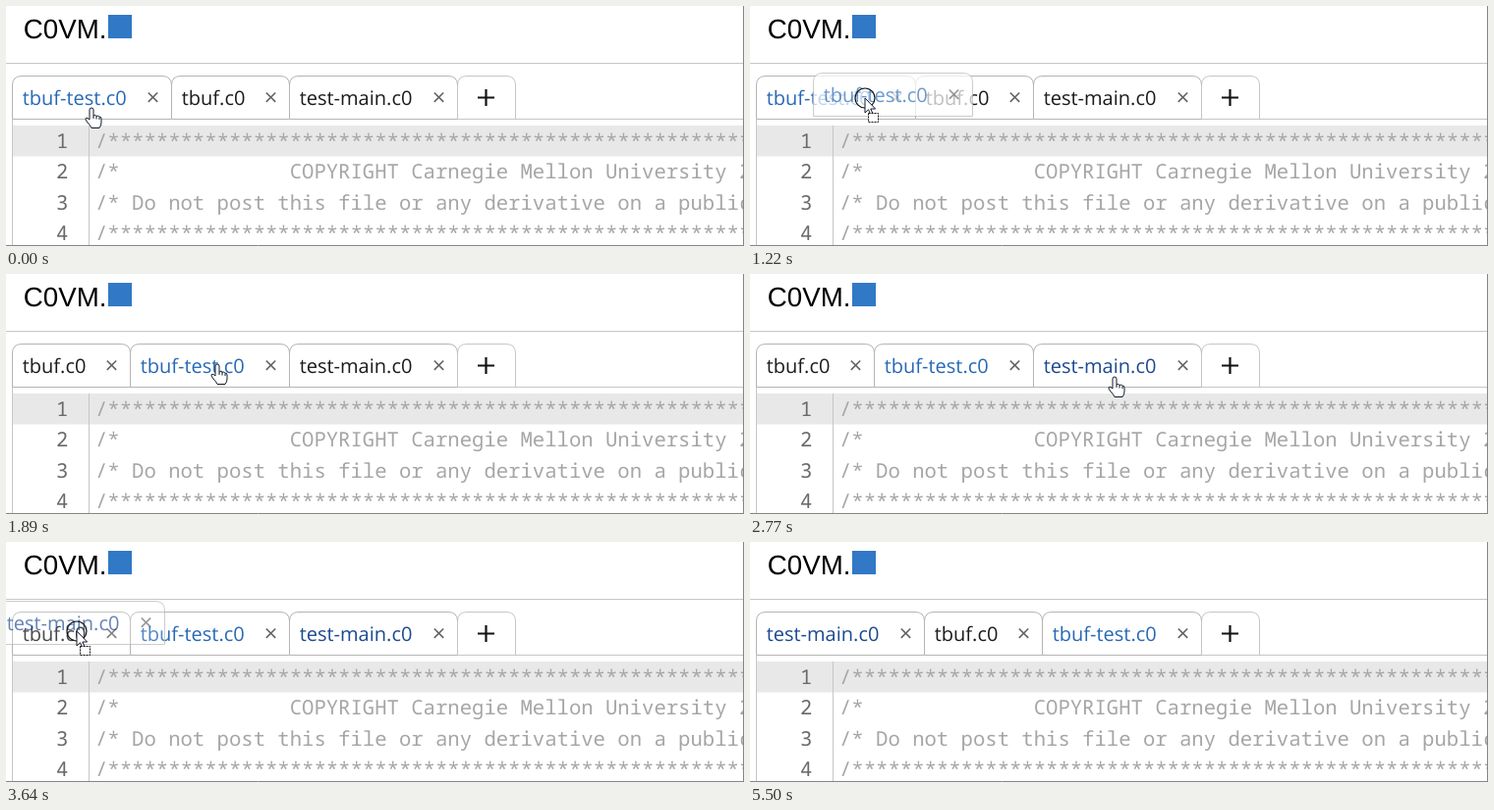
Recreate the animation shown at these times as an HTML page. Size 751 by 245 pixels, loop 5.79 s.

```html
<!DOCTYPE html>
<html lang="en">
<head>
<meta charset="utf-8">
<title>Draggable editor tabs</title>
<style>
  html, body { margin: 0; width: 100%; height: 100%; overflow: hidden; background: #fff; }
  svg { display: block; width: 751px; height: 245px; text-rendering: geometricPrecision; }
  .title { font: 27.7px "Liberation Sans", Arial, sans-serif; }
  .tab text { font: 20px "Open Sans", "Noto Sans", sans-serif; }
  .code text { font: 500 20.6px "Noto Sans Mono", "DejaVu Sans Mono", monospace; white-space: pre; fill: #a6a6a6; }
  .code .num { fill: #6a6a6a; }
  .edge { fill: none; stroke: #c6c6c6; }
  .tab .edge { stroke: #b4b4b4; }
  .close { fill: none; stroke: #666; stroke-width: 1.7; }
  .pen { stroke: #111a2a; stroke-linejoin: round; }
</style>
</head>
<body>
<svg viewBox="0 0 751 245">
  <rect width="751" height="245" fill="#fff"/>
  <text class="title" x="17.8" y="33">C0VM.</text>
  <rect x="104" y="9" width="24" height="24" fill="#3178c6"/>
  <rect y="58" width="750" height="1" fill="#c6c6c6"/>
  <g class="code" id="code"></g>
  <path class="edge" d="M6.5 80V244M6 115.5H750"/>
  <g id="tabs"></g>
  <path class="edge" d="M459.5 115V81Q459.5 71.5 469 71.5H509Q518.5 71.5 518.5 81V115"/>
  <path d="M480 93.5H497M488.5 85V102" stroke="#111" stroke-width="2.2"/>
  <g id="ghost"></g>
  <path d="M750.5 0V244M0 244.5H751" stroke="#858585"/>
  <g id="cursor"></g>
</svg>
<script>
const LOOP = 5790;
const BLUE = '#2869b6', NAVY = '#1d4a90', INK = '#1c1c1c';
const el = id => document.getElementById(id);

const FILES = {
  test: { name: 'tbuf-test.c0', w: 162 },
  tbuf: { name: 'tbuf.c0', w: 120 },
  main: { name: 'test-main.c0', w: 171 }
};
const ORDERS = [
  ['test', 'tbuf', 'main'],
  ['tbuf', 'test', 'main'],
  ['main', 'tbuf', 'test']
];

// time, tab order, cursor, x, y, dragged tab: [file, left, top, backdrop opacity]
const STEPS = [
  [0, 0, 'hand', 87, 104],
  [420, 0, 'hand', 75, 103],
  [540, 0, 'hand', 60, 99],
  [660, 0, 'hand', 51, 97],
  [950, 0, 'press', 59, 97],
  [1080, 0, 'press', 64, 97],
  [1220, 0, 'drag', 117, 94, ['test', 64, 68, .72]],
  [1370, 0, 'drag', 170, 94, ['test', 113, 68, .72]],
  [1490, 0, 'drag', 206, 93, ['test', 152, 68, .72]],
  [1650, 0, 'drag', 213, 93, ['test', 158, 68, .72]],
  [1770, 1, 'hand', 214, 93],
  [1890, 1, 'hand', 215, 92],
  [2340, 1, 'hand', 244, 92],
  [2490, 1, 'hand', 312, 97],
  [2620, 1, 'hand', 370, 104],
  [2770, 1, 'hand', 371, 105],
  [3010, 1, 'press', 369, 104],
  [3130, 1, 'drag', 292, 101, ['main', 222, 71, .3]],
  [3250, 1, 'drag', 204, 98, ['main', 134, 70, .3]],
  [3400, 1, 'drag', 137, 95, ['main', 62, 66, .25]],
  [3520, 1, 'drag', 94, 92, ['main', 14, 62, .2]],
  [3640, 1, 'drag', 72, 91, ['main', -10, 60, .2]],
  [3770, 2, 'hand', 71, 91],
  [4860, 2, 'hand', 75, 90],
  [4980, 2, 'hand', 206, 106],
  [5100, 2, 'beam', 378, 141],
  [5250, 2, 'beam', 464, 187],
  [5380, 2, 'beam', 551, 235],
  [5500, 2, 'none', 0, 0]
];
const HOVER_FROM = 2490;

const STARS = '/' + '*'.repeat(60);
const LINES = [
  STARS,
  '/*' + ' '.repeat(14) + 'COPYRIGHT Carnegie Mellon University 2',
  '/* Do not post this file or any derivative on a public',
  STARS
];

const HAND = `<g class="pen" fill="#fff">
  <path d="M-2 2Q-2 0 0 0Q2 0 2 2V8Q4 6.6 5 8.4Q7 7.4 8 9.2Q10 8.6 10 11V15Q10 18 8 20.5H0Q-1 18 -4 15L-6 12Q-6.4 9.6 -4 10.4L-2 12Z"/>
  <path d="M2 8V11M5 8.5V11.5M8 9.5V12" fill="none"/></g>`;
const RING = '<circle r="10" fill="none" stroke="#111" stroke-width="1.2"/>';
const ARROW = `<path class="pen" fill="#fff" d="M0 0V15L3.6 11.8L6 17.4L8.2 16.4L5.8 11H10.6Z"/>
  <rect x="3.5" y="15.5" width="10" height="9" fill="#fff" stroke="#111" stroke-dasharray="2 1"/>`;
const BEAM = '<path d="M-4 -8H-1L0 -7L1 -8H4M0 -7V7M-4 8H-1L0 7L1 8H4" fill="none" stroke="#111" stroke-width="1.2"/>';
const CURSORS = { hand: HAND, press: RING + HAND, drag: RING + ARROW, beam: BEAM, none: '' };

function tab(key, x, y, color, backdrop, ink) {
  const { name, w } = FILES[key];
  const cx = w - 18.5, r = w - 9;
  const shape = `M.5 44.5V10Q.5 .5 10 .5H${r}Q${w + .5} .5 ${w + .5} 10V44.5Z`;
  return `<g class="tab" transform="translate(${x} ${y})">
    <path d="${shape}" fill="#fff" opacity="${backdrop}"/>
    <g opacity="${ink}"><path class="edge" d="${shape}"/>
    <text x="10.7" y="30.4" fill="${color}">${name}</text>
    <path class="close" d="M${cx - 4.7} 17.5l9.4 9.4m0 -9.4l-9.4 9.4"/></g></g>`;
}

function drawTabs(order, hovered) {
  let x = 6, out = '';
  for (const key of ORDERS[order]) {
    const color = key === 'test' ? BLUE : key === 'main' && hovered ? NAVY : INK;
    out += tab(key, x, 71, color, 1, 1);
    x += FILES[key].w;
  }
  return out;
}

function drawCode() {
  let out = '<rect x="7" y="122" width="743" height="31.5" fill="#e8e8e8"/><path class="edge" d="M84.5 122V244"/>';
  LINES.forEach((line, i) => {
    const y = Math.round(145 + i * 31.4);
    out += `<text class="num" x="51" y="${y}">${i + 1}</text><text x="91" y="${y}" xml:space="preserve">${line}</text>`;
  });
  return out;
}

let shown = -1;
function render(ms) {
  let i = STEPS.length - 1;
  while (STEPS[i][0] > ms) i--;
  if (i === shown) return;
  shown = i;
  const [t, order, kind, x, y, drag] = STEPS[i];
  el('tabs').innerHTML = drawTabs(order, t >= HOVER_FROM);
  el('ghost').innerHTML = drag
    ? tab(drag[0], drag[1], drag[2], drag[0] === 'main' ? NAVY : BLUE, drag[3], .68) : '';
  el('cursor').innerHTML = CURSORS[kind];
  el('cursor').setAttribute('transform', `translate(${x} ${y})`);
}

el('code').innerHTML = drawCode();
const start = performance.now();
function tick() {
  render((performance.now() - start) % LOOP);
  requestAnimationFrame(tick);
}
tick();
</script>
</body>
</html>
```
